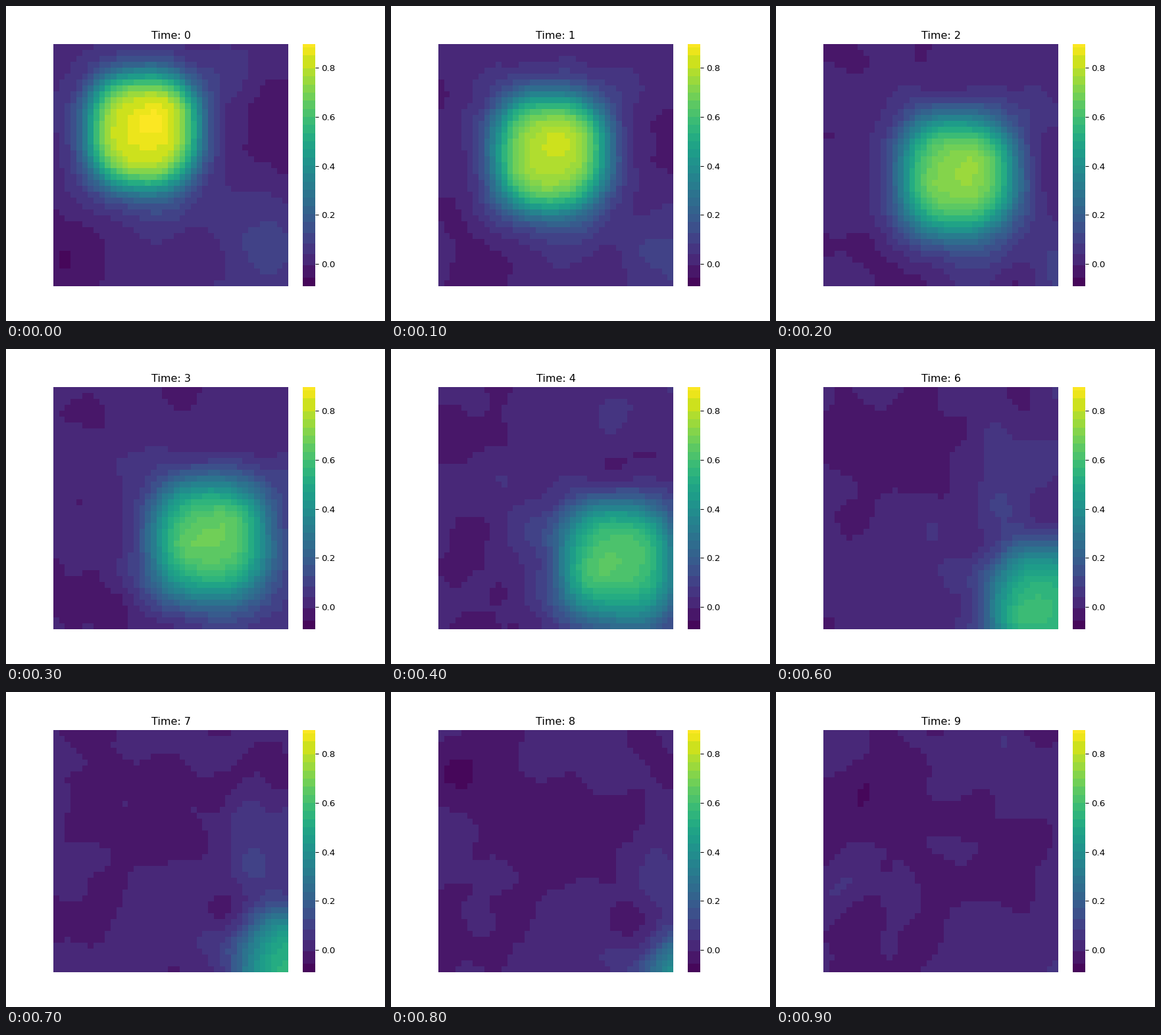
Write a matplotlib script that moves like this. It is 576 px wide and 480 px high and loops after 1000 ms.

```python
import numpy as np
import matplotlib.pyplot as plt
from matplotlib.animation import FuncAnimation
from matplotlib.colors import BoundaryNorm, ListedColormap

SIZE, FRAMES = 41, 10
LOW, HIGH = -0.0915, 0.8985
DRIFT = np.array([3.9, 3.75])  # cells per frame
PLUME_START = np.array([15.6, 14.6])
DECAY = 0.85

# Main drifting patches: birth time, x, y in cells, strength
PATCHES = [
    (0, 19, 12.5, 0.045), (0, 18.5, 29, 0.06), (0, 31, 6, 0.05),
    (0, 36.5, 35.5, 0.09), (0, 39.8, 15, -0.085), (0, 3, 36, -0.07),
    (4, 1, 5.8, -0.055), (4, 29, 4.2, 0.055), (4, 16, 25.3, 0.05),
    (6, 31, 19.2, 0.055), (6, 7.6, 5.3, -0.05), (8, 5, 7.2, -0.075),
]

cols, rows = np.meshgrid(np.arange(SIZE) + 0.5, np.arange(SIZE) + 0.5)


def distance(center, power=2):
    dx, dy = abs(cols - center[0]), abs(rows - center[1])
    return (dx ** power + dy ** power) ** (1 / power)


def smooth_noise(seed, size=96, sigma=2.5):
    white = np.random.default_rng(seed).normal(size=(size, size))
    freq = np.fft.fftfreq(size)
    blur = np.exp(-2 * (np.pi * sigma) ** 2 * (freq[:, None] ** 2 + freq ** 2))
    smooth = np.fft.ifft2(np.fft.fft2(white) * blur).real
    return smooth / smooth.std()


def background(t):
    """Noise born in every frame, carried along and fading."""
    total = np.full((SIZE, SIZE), 0.014 - 0.0017 * t)
    for age in range(t + 1):
        dx, dy = np.rint(DRIFT * age).astype(int)
        moved = np.roll(smooth_noise(40 + t - age), (dy, dx), axis=(0, 1))
        total += 0.01 * DECAY ** age * moved[:SIZE, :SIZE]
    return total


def plume(t):
    """Rounded square with a soft edge that widens at first."""
    radius = distance(PLUME_START + DRIFT * t, power=2.5)
    width = 1.7 + 0.2 * min(t, 3)
    return 0.85 * 0.94 ** t / (1 + np.exp((radius - 9.4) / width))


def field(t):
    values = background(t) + plume(t)
    for birth, x, y, strength in PATCHES:
        age = t - birth
        if age >= 0:
            r = distance(np.array([x, y]) + DRIFT * age)
            spread = 1.2 + 45 * abs(strength)
            values += strength * DECAY ** age * np.exp(-(r / spread) ** 2 / 2)
    return np.clip(values, LOW + 1e-4, HIGH - 1e-4)


# Colour bands: wide at the low end, even above
edges = np.concatenate([[LOW, -0.056], np.linspace(-0.005, 0.171, 5),
                        np.linspace(0.204, 0.798, 19), [0.852, 0.884, HIGH]])
middles = (edges[:-1] + edges[1:]) / 2
cmap = ListedColormap(plt.get_cmap("viridis")((middles - LOW) / (HIGH - LOW)))

fig, ax = plt.subplots(figsize=(6, 5), dpi=96)
mesh = ax.pcolormesh(field(0), cmap=cmap, norm=BoundaryNorm(edges, cmap.N))
ax.invert_yaxis()
ax.set(xticks=[], yticks=[])
ax.spines[:].set_visible(False)
title = ax.set_title("Time: 0")

bar = fig.colorbar(mesh, ax=ax, spacing="proportional", format="%.1f",
                   ticks=np.arange(5) / 5)
bar.minorticks_off()
bar.outline.set_linewidth(0)


def draw(t):
    mesh.set_array(field(t))
    title.set_text(f"Time: {t}")
    return mesh, title


anim = FuncAnimation(fig, draw, frames=FRAMES, interval=100, repeat=True)
plt.show()
```
